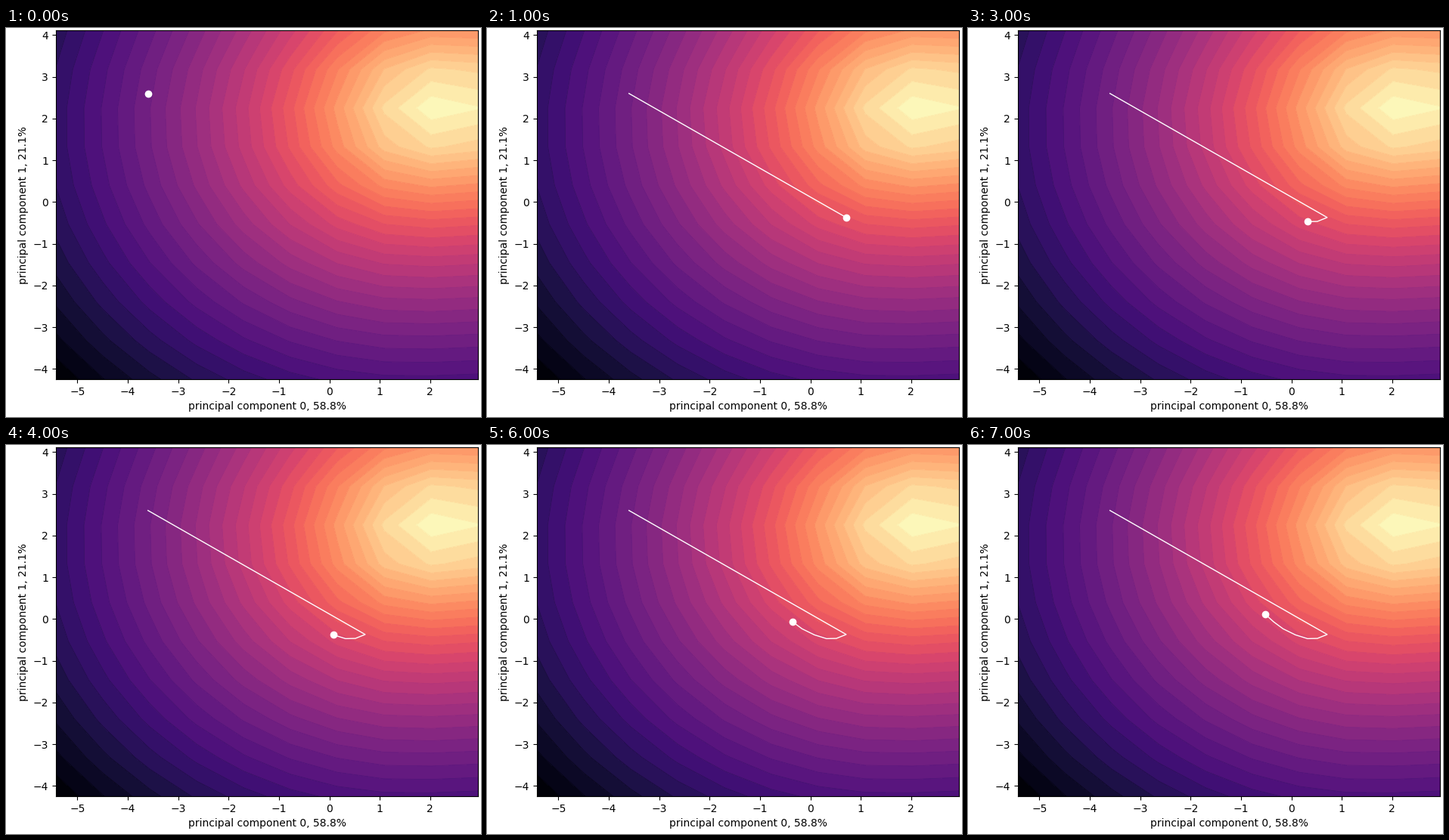
These frames come from a looping animation (628 by 515 pixels, 8 s). A matplotlib script:

```python
import numpy as np
import matplotlib.pyplot as plt
from matplotlib.animation import FuncAnimation

W, H, DPI = 628, 515, 100
LEFT, RIGHT, TOP, BOTTOM = 65.75, 624.15, 3.3, 465
XLIM, YLIM = (-5.43, 2.95), (-4.245, 4.1085)
CELLS, BANDS = 9, 35
PEAK_COL, PEAK_ROW, PEAK = 8, 2, 34.8

# Points visited by the dot: one long jump, then a slow curve back
PATH = np.array([
    (-3.60, 2.60), (0.71, -0.37), (0.515, -0.465), (0.32, -0.47),
    (0.08, -0.38), (-0.165, -0.235), (-0.355, -0.065), (-0.52, 0.115),
])


def landscape():
    """Height in contour bands on a coarse grid, top row first."""
    row, col = np.mgrid[0:CELLS + 1, 0:CELLS + 1]
    dx = PEAK_COL - col
    dx = np.where(dx > 0, dx, 0.5 * dx)
    dy = 1.02 * (row - PEAK_ROW - 0.06 * dx)
    r = np.hypot(dx, dy)
    return PEAK - 8.5 * np.log(1 + (r / 1.7) ** 2) - 0.0033 * r ** 3


fig = plt.figure(figsize=(W / DPI, H / DPI), dpi=DPI)
ax = fig.add_axes([LEFT / W, 1 - BOTTOM / H,
                   (RIGHT - LEFT) / W, (BOTTOM - TOP) / H])

xs = np.linspace(*XLIM, CELLS + 1)
ys = np.linspace(*YLIM, CELLS + 1)
grid = np.clip(landscape(), 0, BANDS)[::-1]
levels = np.arange(BANDS + 1)
ax.contourf(xs, ys, grid, levels=levels, cmap="magma")
# Slightly darker seams between bands, fading out towards the peak
ax.contour(xs, ys, grid, levels=levels[1:-1], cmap="magma",
           vmin=3, vmax=BANDS + 1, linewidths=0.5, alpha=0.6)

ax.set_xlim(XLIM)
ax.set_ylim(YLIM)
ax.set_xticks(range(-5, 3))
ax.set_yticks(range(-4, 5))
ax.set_xlabel("principal component 0, 58.8%")
ax.set_ylabel("principal component 1, 21.1%")

trail, = ax.plot([], [], color="white", lw=1, zorder=3)
dot, = ax.plot([], [], "o", color="white", zorder=4)


def update(step):
    done = PATH[:step + 1]
    trail.set_data(done[:, 0], done[:, 1])
    dot.set_data(done[-1:, 0], done[-1:, 1])
    return trail, dot


anim = FuncAnimation(fig, update, frames=len(PATH), interval=1000, repeat=True)
plt.show()
```
